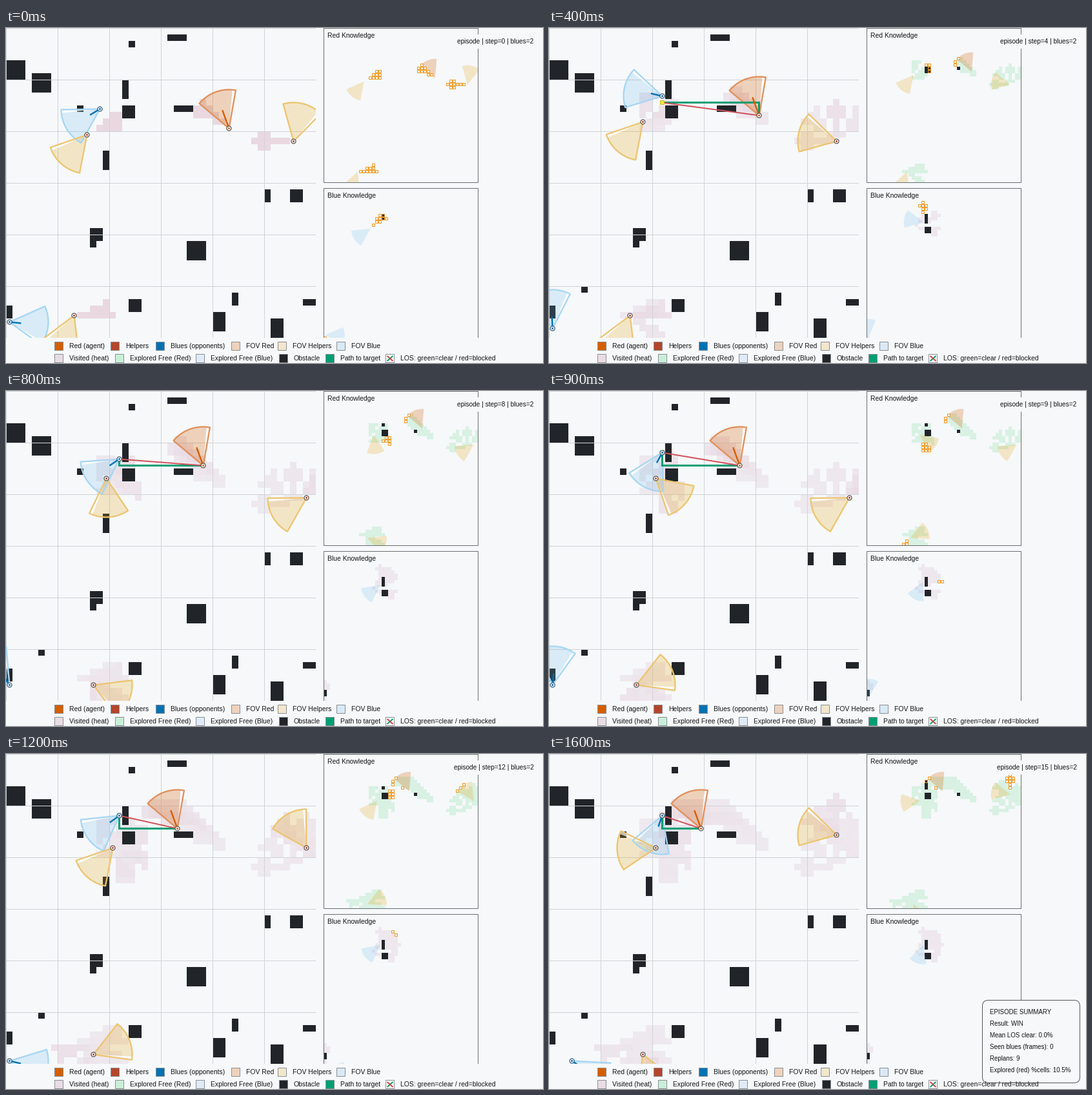
These frames come from a looping animation (832x519 px, 1700 ms). A matplotlib script:

```python
import numpy as np
import matplotlib.pyplot as plt
from matplotlib.animation import FuncAnimation
from matplotlib.patches import Circle, FancyBboxPatch, Polygon, Rectangle

plt.rcParams["path.snap"] = False

W, H = 832, 519
N, CELL, STEPS = 48, 10, 16
SIZE = N * CELL
BG, INK, GRID = "#f6f8fa", "#212529", "#d0d3d6"
RED, HELPER, BLUE = "#d55e00", "#b5452b", "#0072b2"
GREEN, LOS, FRONTIER = "#009e73", "#d0525a", "#f59a23"

# Obstacles in cells: x, y, width, height
WALLS = [
    (0, 5, 3, 3), (4, 7, 3, 3), (19, 2, 1, 1), (25, 1, 3, 1), (18, 8, 1, 3),
    (18, 12, 2, 2), (11, 12, 1, 1), (26, 12, 3, 1), (15, 19, 1, 3),
    (40, 25, 1, 2), (44, 25, 2, 2), (13, 31, 2, 2), (13, 33, 1, 1),
    (28, 33, 3, 3), (35, 41, 1, 2), (46, 42, 2, 1), (19, 42, 2, 2),
    (32, 44, 2, 3), (41, 45, 2, 3), (0, 43, 1, 2),
]
LATE_WALL = (5, 40, 1, 1)

# Fill, fill alpha, outline of each field of view
FOV = {
    "red": (RED, 0.25, "#e1905a"),
    "helper": ("#e69f00", 0.21, "#ecc56f"),
    "blue": ("#56b4e9", 0.18, "#a6d6f3"),
}


class Agent:
    """Walks the grid between key poses (step, x, y, bearing)."""

    def __init__(self, kind, color, *keys, turn=None):
        self.kind, self.color, self.turn = kind, color, turn
        self.steps, self.xs, self.ys, self.bearings = zip(*keys)

    def cell(self, s):
        x = np.interp(s, self.steps, self.xs)
        y = np.interp(s, self.steps, self.ys)
        return int(np.floor(x + 0.5)), int(np.ceil(y - 0.5))

    def pos(self, s):
        return tuple(c * CELL + 5.5 for c in self.cell(s))

    def bearing(self, s):
        a = np.interp(s, self.steps, self.bearings)
        if self.turn:
            start = self.bearings[0]
            a = start + self.turn * np.rint((a - start) / self.turn)
        return a


def helper(*keys):
    return Agent("helper", HELPER, *keys, turn=45)


red = Agent("red", RED, (0, 34, 15, 110), (8, 30, 11, 110), (15, 23, 11, 110))
helpers = [
    helper((0, 12, 16, 229), (2, 13, 15, 184), (3, 13, 15, 184),
           (4, 14, 14, 229), (7, 14, 13, 229), (9, 16, 13, 319),
           (10, 16, 14, 319), (12, 16, 14, 229), (15, 16, 14, 184)),
    helper((0, 44, 17, 75.5), (3, 44, 17, 210.5), (4, 44, 17, 165.5),
           (5, 44, 17, 210.5), (7, 45, 16, 210.5), (9, 46, 16, 210.5),
           (11, 46, 15, 120.5), (12, 46, 14, 120.5), (14, 44, 13, 120.5),
           (15, 44, 12, 165.5)),
    helper((0, 10, 44, 247), (2, 12, 44, 247), (3, 12, 44, 292),
           (4, 12, 44, 247), (7, 13, 44, 337), (8, 13, 45, 337),
           (10, 13, 45, 427), (12, 13, 46, 382), (14, 14, 46, 292),
           (15, 14, 46, 292)),
]
blues = [
    Agent("blue", BLUE, (0, 14, 12, 211), (1, 15, 12, 262), (2, 16, 12, 262),
          (4, 17, 10, 167), (7, 17, 10, 214), (8, 17, 10, 214),
          (10, 17, 9, 269), (12, 17, 9, 216), (14, 17, 9, 250),
          (15, 17, 9, 250)),
    Agent("blue", BLUE, (0, 0, 45, -6), (2, 0, 46, 74), (4, 0, 46, 93),
          (6, 0, 46, 165), (8, 0, 45, 125), (10, 0, 46, 43.5),
          (12, 0, 47, -13), (15, 3, 47, -33)),
]
reds = [red] + helpers

Y, X = np.mgrid[:N, :N]
blocked = np.zeros((N, N), bool)
for wx, wy, ww, wh in WALLS:
    blocked[wy:wy + wh, wx:wx + ww] = True


def seen_by(agent, s):
    """Cells inside the narrow sensing cone; its bearing mirrors the wedge."""
    cx, cy = agent.cell(s)
    dx, dy = X - cx, cy - Y
    dist = np.hypot(dx, dy)
    off = np.degrees(np.arctan2(dy, dx)) - 255 + agent.bearing(s)
    off = (off + 180) % 360 - 180
    return (dist > 0) & (dist <= 6) & (np.abs(off) <= 15)


def explore(team):
    """Per step: known cells, newly found cells and decaying heat."""
    known, heat, log = np.zeros((N, N), bool), np.zeros((N, N)), []
    for s in range(STEPS):
        seen = np.any([seen_by(a, s) for a in team], axis=0)
        fresh = seen & ~known
        known = known | seen
        heat = heat * 0.8 + seen
        log.append((known, fresh, heat))
    return log


red_log, blue_log = explore(reds), explore(blues)


def heat_image(known, heat):
    level = (heat / heat.max())[..., None]
    cool, hot = np.array([239, 234, 240]), np.array([233, 216, 224])
    rgb = (cool + (hot - cool) * level) / 255
    return np.dstack([rgb, known])


def knowledge_image(known, rgb):
    img = np.zeros((N, N, 4))
    img[known] = [c / 255 for c in rgb] + [1]
    img[known & blocked] = [33 / 255, 37 / 255, 41 / 255, 1]
    return img


fig = plt.figure(figsize=(W / 100, H / 100), dpi=100, facecolor=BG)


def make_axes(x, y, w, h, xmax=SIZE, ymax=SIZE, z=1):
    ax = fig.add_axes([x / W, 1 - (y + h) / H, w / W, h / H], zorder=z)
    ax.set(xlim=(0, xmax), ylim=(ymax, 0))
    ax.axis("off")
    return ax


field = make_axes(0, 0, 480, 480)
red_map = make_axes(492, 0, 240, 240)
blue_map = make_axes(492, 248, 240, 240)
stage = make_axes(0, 0, W, H, W, H, 2)


def box(ax, x, y, w, h, fill, edge="none", px=1, z=1):
    return ax.add_patch(Rectangle((x, y), w, h, fc=fill, ec=edge,
                                  lw=px * 0.72 if edge != "none" else 0,
                                  joinstyle="miter", zorder=z))


def line(ax, pts, color, px, z):
    xs, ys = zip(*pts)
    return ax.plot(xs, ys, color=color, lw=px * 0.72, zorder=z,
                   solid_capstyle="butt", solid_joinstyle="miter")[0]


def label(x, y, text, px=10.4, ha="left", z=6):
    return stage.text(x, y, text, fontsize=px * 0.72, color="#141414",
                      family="Liberation Sans", ha=ha, va="baseline", zorder=z)


def ray(pos, angle, length):
    t = np.radians(angle)
    return pos[0] + length * np.cos(t), pos[1] - length * np.sin(t)


def sector(pos, a0, a1):
    return [pos] + [ray(pos, a, 60) for a in np.linspace(a0, a1, 24)]


def cells(ax, img):
    art = ax.imshow(img, extent=(0, SIZE, SIZE, 0), aspect="auto",
                    interpolation="nearest", zorder=1)
    ax.set(xlim=(0, SIZE), ylim=(SIZE, 0))
    return art


def draw_static():
    for wall in WALLS:
        box(field, *(v * CELL for v in wall), INK, z=2)
    for v in range(0, SIZE, 80):
        box(field, v, 0, 1, SIZE, GRID, z=3)
        box(field, 0, v, SIZE, 1, GRID, z=3)
    for y, name in [(0, "Red Knowledge"), (248, "Blue Knowledge")]:
        box(stage, 492.5, y + 0.5, 239, 239, "none", "#6c6f73")
        label(498, y + 15, name)
    # The lower panel runs under the legend strip
    box(stage, 490, 480, 244, 39, BG, z=2)

    rows = [
        (486, [(75, RED, "Red (agent)"), (162, HELPER, "Helpers"),
               (232, BLUE, "Blues (opponents)"), (349, "#eed2bd", "FOV Red"),
               (421, "#f2e6cb", "FOV Helpers"), (512, "#d9e9f5", "FOV Blue")]),
        (505, [(75, "#e9dce4", "Visited (heat)"),
               (169, "#c9efd8", "Explored Free (Red)"),
               (294, "#dfebf7", "Explored Free (Blue)"),
               (423, INK, "Obstacle"), (495, GREEN, "Path to target"),
               (588, "#ffffff", "LOS: green=clear / red=blocked")]),
    ]
    for y, items in rows:
        for x, color, text in items:
            box(stage, x + 0.5, y + 0.5, 13, 13, color, "#8b8f94", z=5)
            label(x + 23, y + 10, text)
    line(stage, [(590.5, 516), (599.5, 508)], GREEN, 2, 6)
    line(stage, [(590.5, 508), (599.5, 516)], "#d6453d", 2, 6)


def draw_fov(agent, s):
    pos, mid = agent.pos(s), agent.bearing(s)
    fill, alpha, edge = FOV[agent.kind]
    lo, hi = mid - 30, mid + 30
    gap = Polygon(sector(pos, lo, lo + 5), fc="white", alpha=0.7, lw=0, zorder=4)
    body = Polygon(sector(pos, lo + 5, hi), fc=fill, alpha=alpha, lw=0, zorder=4)
    rim = Polygon(sector(pos, lo, hi), fill=False, ec=edge, lw=2.3 * 0.72,
                  joinstyle="round", zorder=4.5)
    return [field.add_patch(p) for p in (gap, body, rim)]


def draw_marker(agent, s):
    pos, out = agent.pos(s), []
    reach = {"red": 30, "blue": 18}.get(agent.kind)
    if reach:
        out.append(line(field, [pos, ray(pos, agent.bearing(s), reach)],
                        agent.color, 2.4, 6))
    edge = "#3f5f78" if agent.kind == "blue" else "#5a5552"
    ring = Circle(pos, 3.5, fc="white", ec=edge, lw=0.9, zorder=8)
    dot = Circle(pos, 1.5, fc=agent.color, lw=0, zorder=8)
    return out + [field.add_patch(ring), field.add_patch(dot)]


def draw_path(s):
    """Route and sight line to where the first blue was last reported."""
    tx, ty = blues[0].pos(s if s >= 9 else s - 1)
    rx, ry = red.pos(s)
    corner, lane = 175.5, 145.5 if s < 4 else 115.5
    route = [(tx, ty), (corner, ty), (corner, lane), (rx, lane), (rx, ry)]
    return [line(field, route, GREEN, 3, 5),
            line(field, [(tx, ty), (rx, ry)], LOS, 2, 5.5),
            box(field, tx - 3, ty - 3, 6, 6, "#f0e442", "#c9b92c", z=7)]


def draw_map(ax, team, log, rgb, s):
    known, fresh, _ = log[s]
    out = [cells(ax, knowledge_image(known, rgb))]
    for a in team:
        fill, alpha, _ = FOV[a.kind]
        mid = a.bearing(s)
        wedge = Polygon(sector(a.pos(s), mid - 25, mid + 30),
                        fc=fill, alpha=alpha, lw=0, zorder=2)
        out.append(ax.add_patch(wedge))
    for cy, cx in np.argwhere(fresh):
        fill = INK if blocked[cy, cx] else "#eef1ec"
        out.append(box(ax, cx * CELL + 1, cy * CELL + 1, 8, 8,
                       fill, FRONTIER, z=3))
    return out


def draw_summary():
    lines = ["EPISODE SUMMARY", "Result: WIN", "Mean LOS clear: 0.0%",
             "Seen blues (frames): 0", "Replans: 9",
             "Explored (red) %cells: 10.5%"]
    style = "round,pad=0,rounding_size=9"
    panel = FancyBboxPatch((671.5, 381.5), 151, 128, boxstyle=style, fc=BG,
                           ec="#55585c", lw=0.72, zorder=4)
    return [stage.add_patch(panel)] + [
        label(683, 403 + 18 * i, t, 9.8) for i, t in enumerate(lines)]


live = []


def draw(frame):
    while live:
        live.pop().remove()
    s = min(frame, STEPS - 1)
    known, _, heat = red_log[s]
    live.append(cells(field, heat_image(known, heat)))
    if s:
        live.append(box(field, *(v * CELL for v in LATE_WALL), INK, z=2))
        live.extend(draw_path(s))
    for a in blues + helpers + [red]:
        live.extend(draw_fov(a, s))
        live.extend(draw_marker(a, s))
    live.extend(draw_map(red_map, reds, red_log, (216, 241, 227), s))
    live.extend(draw_map(blue_map, blues, blue_log, (238, 231, 238), s))
    left = 693 if s < 10 else 687
    live.append(box(stage, left, 10, 823 - left, 22, BG, z=3))
    live.append(label(817.5, 24, f"episode | step={s} | blues=2", 10.1, "right"))
    if frame == STEPS:
        live.extend(draw_summary())
    return live


draw_static()
anim = FuncAnimation(fig, draw, frames=STEPS + 1, interval=100,
                     init_func=lambda: [], repeat=True, repeat_delay=0)
plt.show()
```
